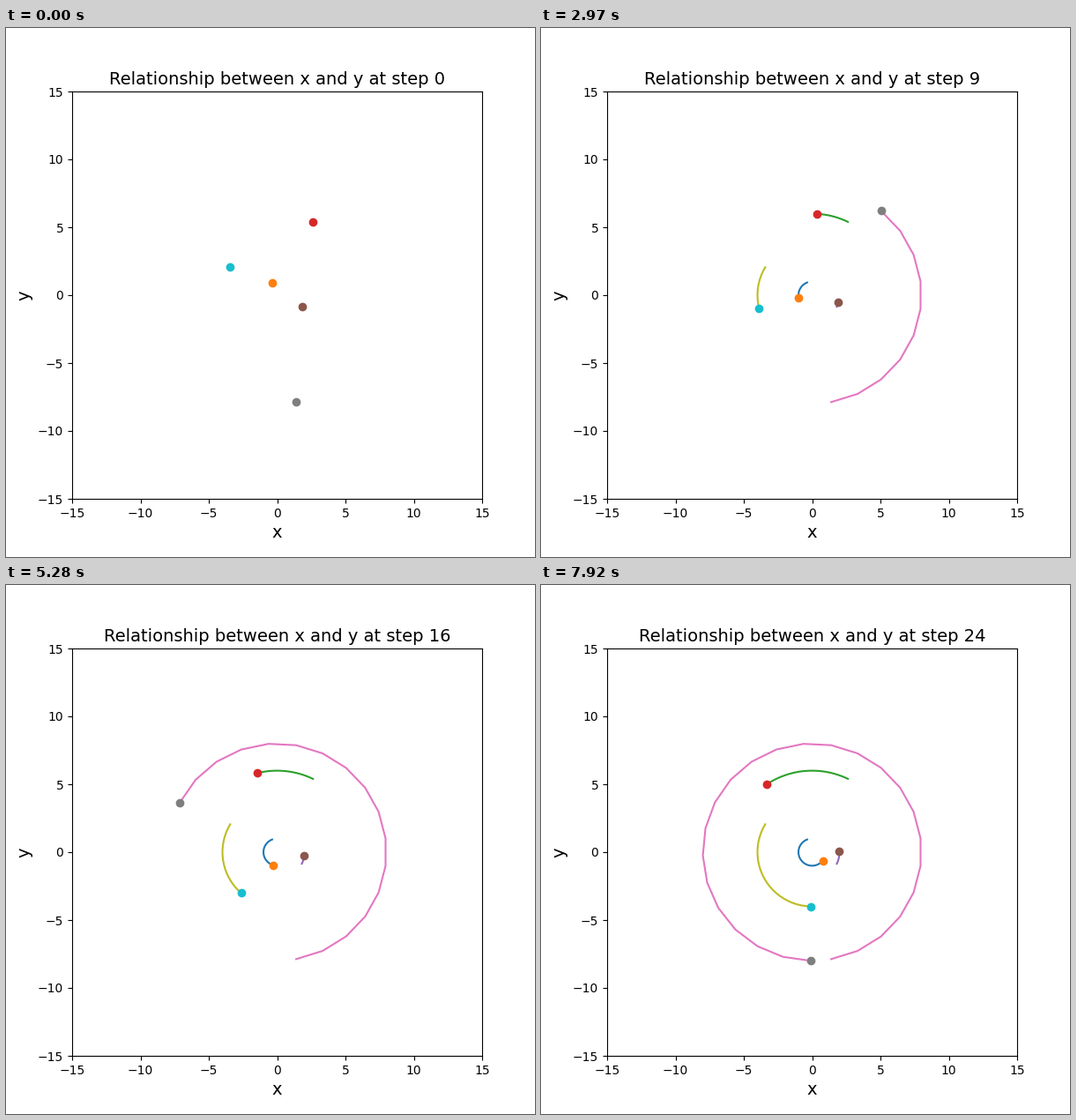
These frames come from a looping animation (600 px wide and 600 px high, 8 s). A matplotlib script:

```python
import numpy as np
import matplotlib.pyplot as plt
from matplotlib.animation import FuncAnimation

LOOP_MS = 8000
STEP_MS = 330
TICK_MS = 40

# radius, start angle, angle per step (degrees)
ORBITS = [
    (1, 111.1, 8.77),
    (6, 64.1, 2.48),
    (2, -25.3, 1.13),
    (8, -80.0, 14.545),
    (4, 149.1, 4.98),
]

fig, ax = plt.subplots(figsize=(6, 6), dpi=100)
ax.set_xlim(-15, 15)
ax.set_ylim(-15, 15)
ax.set_xlabel("x", fontsize=14)
ax.set_ylabel("y", fontsize=14)
title = ax.set_title("", fontsize=14)

bodies = []
for i in range(len(ORBITS)):
    trail, = ax.plot([], [], color=f"C{2 * i}")
    dot, = ax.plot([], [], "o", color=f"C{2 * i + 1}")
    bodies.append((trail, dot))


def path(orbit, step):
    radius, start, speed = orbit
    angle = np.radians(start + speed * np.arange(step + 1))
    return radius * np.cos(angle), radius * np.sin(angle)


def update(tick):
    # a step shows from the tick that contains its start time
    step = ((tick + 1) * TICK_MS - 1) // STEP_MS
    title.set_text(f"Relationship between x and y at step {step}")
    for orbit, (trail, dot) in zip(ORBITS, bodies):
        x, y = path(orbit, step)
        trail.set_data(x, y)
        dot.set_data(x[-1:], y[-1:])
    return [title, *(artist for body in bodies for artist in body)]


anim = FuncAnimation(fig, update, frames=LOOP_MS // TICK_MS, interval=TICK_MS,
                     init_func=lambda: update(0), repeat=True, repeat_delay=0)
plt.show()
```
